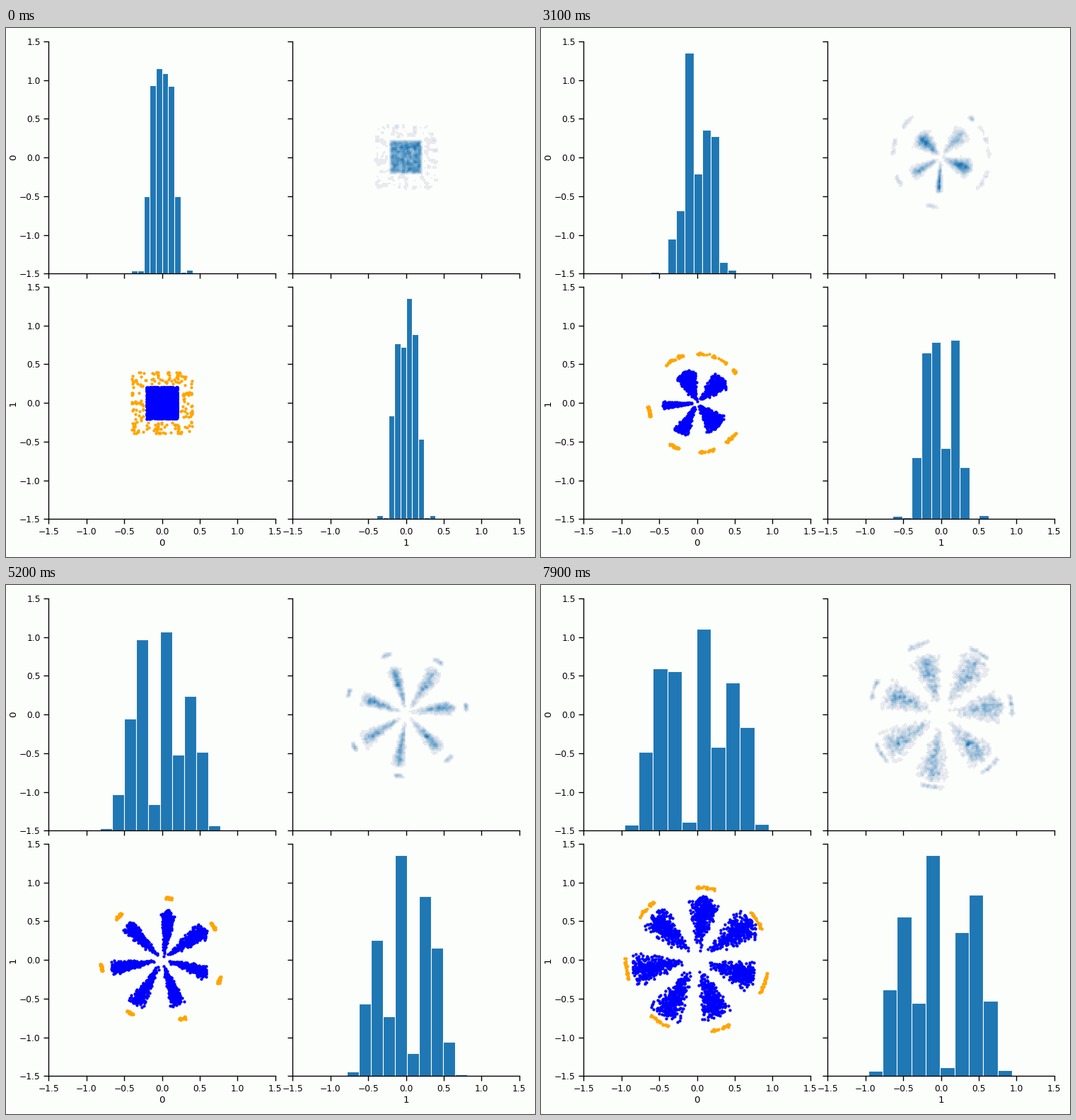
A matplotlib script that plays this animation: 748 by 748 pixels, repeating every 8000 ms.

```python
import numpy as np
import matplotlib.pyplot as plt
from matplotlib.animation import FuncAnimation
from matplotlib.colors import LinearSegmentedColormap

SIZE, DPI = 748, 100
FRAMES, INTERVAL = 80, 100
BG, BAR = "#fcfefc", "#1f77b4"
LIM = 1.5
N_BLUE, N_RING = 2500, 210

plt.rcParams.update({
    "font.family": "DejaVu Sans", "font.size": 8.8,
    "axes.linewidth": 1.0, "axes.facecolor": BG, "figure.facecolor": BG,
    "savefig.facecolor": BG,
})

# Key poses: times in seconds, histogram ranges and bar heights
TIMES = np.array([0, 1.3, 3.1, 4.4, 5.9, 6.8, 7.9])

RANGE_0 = np.array([(-.403, .407), (-.538, .538), (-.613, .52), (-.763, .716),
                    (-.875, .828), (-.931, .89), (-.964, .95)])
RANGE_1 = np.array([(-.385, .392), (-.538, .53), (-.64, .632), (-.707, .745),
                    (-.843, .857), (-.885, .9), (-.964, .941)])
HIST_0 = np.array([
    (.035, .035, 1.0, 2.43, 2.645, 2.585, 2.415, 1.0, .02, .05),
    (.01, .02, 0, .025, 2.605, 2.852, 0, 0, .01, .01),
    (.02, 0, .45, .815, 2.852, 1.29, 1.852, 1.77, .15, .05),
    (.02, .285, 1.19, 2.53, .51, 2.605, .95, 1.795, .72, .05),
    (.035, .635, 1.67, 2.404, .195, 2.53, 1.0, 1.685, 1.27, .08),
    (.045, .855, 1.95, 2.404, .155, 2.615, 1.155, 1.857, 1.43, .095),
    (.08, 1.015, 2.093, 2.057, .11, 2.596, 1.08, 1.906, 1.335, .085),
])
HIST_1 = np.array([
    (.05, .02, 1.335, 2.267, 2.22, 2.85, 2.377, 1.03, .02, .045),
    (.008, .01, 0, .07, 2.64, 2.74, .025, 0, .01, .003),
    (.035, .025, .8, 2.148, 2.285, .914, 2.31, .667, .01, .045),
    (.05, .8, 1.675, .75, 2.85, .457, 2.36, 1.43, .256, .018),
    (.06, 1.05, 1.82, .777, 2.85, .146, 2.276, 1.846, .604, .027),
    (.075, 1.3, 1.915, 1.02, 2.85, .12, 2.25, 2.13, .832, .05),
    (.07, 1.11, 2.05, .94, 2.85, .11, 1.856, 2.335, .97, .078),
])
BAR_TOP = 2 * LIM / 1.05

rng = np.random.default_rng(7)


def polar(r, deg):
    a = np.radians(deg)
    return np.column_stack([r * np.cos(a), r * np.sin(a)])


def blue_poses():
    """Square, collapsed blob, then seven petals that lengthen and widen."""
    petal = np.arange(N_BLUE) % 7
    s = rng.beta(3.5, 1.8, N_BLUE)
    z = np.clip(rng.normal(size=N_BLUE), -2.3, 2.3)
    jitter = rng.normal(0, .006, (N_BLUE, 2))
    reach = np.array([.83, .9, .8, .8, .87, .88, .83])
    angle = np.array([83, 35, -17, -70, -122, -171, 136])
    early = np.array([112, 43, -46, -50, -120, -176, 113])
    early_width = np.array([8, 7.5, 9, 9, 5, 2.2, 8])
    thin_width = np.array([1.8, 3.6, 2, 2.6, 2.8, 1.3, 2.8])
    bend = np.array([-14, 4, 16, -4, 2, 2, -2])

    def petals(scale, inner, deg, width, curve=0 * bend):
        r = reach[petal] * scale * (inner + (1 - inner) * s)
        spread = np.broadcast_to(width, 7)[petal] * z
        return polar(r, deg[petal] + curve[petal] * (1 - s) + spread) + jitter

    square = rng.uniform(-.205, .205, (N_BLUE, 2))
    sigma = np.where(rng.random(N_BLUE) < .6, .022, .05)
    blob = np.clip(rng.normal(size=(N_BLUE, 2)), -2.6, 2.6) * sigma[:, None]
    return np.array([
        square, blob,
        petals(.52, 0, early, early_width),
        petals(.7, 0, angle, thin_width, bend),
        petals(.86, .03, angle, 4.8),
        petals(.94, .07, angle, 6),
        petals(1, .1, angle, 6.5),
    ])


def ring_poses():
    """Radius and angle of the outer points: square, circle, then seven arcs."""
    arc = np.arange(N_RING) % 7
    u = rng.uniform(-1, 1, N_RING)
    centre = 84 - 360 / 7 * arc
    free = centre + 180 / 7 * u
    free += 5 * np.sin(np.radians(9 * free))
    a = np.radians(free)
    inward = 1 - .38 * rng.random(N_RING) ** 2
    square = .395 * inward / np.maximum(abs(np.cos(a)), abs(np.sin(a)))
    mid = np.array([74, 39.5, -45, -78, -118, -170, 118])
    mid_width = np.array([22, 2.5, 8, 10, 6, 6, 12])
    small = np.array([1, 3, 1.2, 1, 1, .8, 1.8])
    wobble = rng.normal(0, .007, N_RING)
    radius = [square] + [r + wobble for r in (.535, .64, .745, .855, .9, .94)]
    angle = [free, free, mid[arc] + mid_width[arc] * u, centre + small[arc] * u,
             centre + 5.5 * u, centre + 7.2 * u, centre + 8.6 * u]
    return np.array(radius), np.array(angle)


BLUE = blue_poses()
RING_R, RING_A = ring_poses()


def phase(t):
    """Index of the current key pose and eased progress to the next."""
    k = min(np.searchsorted(TIMES, t, side="right") - 1, len(TIMES) - 2)
    p = (t - TIMES[k]) / (TIMES[k + 1] - TIMES[k])
    if k == 0:
        p = 1 - (1 - p) ** 3
    elif k == 1:
        p = p ** 2
    return k, p


def blend(keys, k, p):
    return keys[k] * (1 - p) + keys[k + 1] * p


# Density map
CELLS = 116
EXTENT = 1.08
EDGES = np.linspace(-EXTENT, EXTENT, CELLS + 1)
KERNEL = np.array([.25, .5, .25])


def density(points):
    h = np.histogram2d(points[:, 0], points[:, 1], bins=(EDGES, EDGES))[0]
    for axis in (0, 1):
        h = sum(w * np.roll(h, d, axis) for w, d in zip(KERNEL, (-1, 0, 1)))
    h /= h.max()
    return np.ma.masked_where(h < .02, np.minimum(np.floor(h * 10), 9) / 9)


# Layout
fig = plt.figure(figsize=(SIZE / DPI, SIZE / DPI), dpi=DPI)


def panel(left, top, xlabels, ylabels):
    w, h = 320.5, 328.4
    ax = fig.add_axes([left / SIZE, 1 - (top + h) / SIZE, w / SIZE, h / SIZE])
    ax.set(xlim=(-LIM, LIM), ylim=(-LIM, LIM),
           xticks=np.arange(-1.5, 1.6, .5), yticks=np.arange(-1.5, 1.6, .5))
    ax.xaxis.set_major_formatter("{x:.1f}")
    ax.yaxis.set_major_formatter("{x:.1f}")
    ax.tick_params(length=4.8, width=1, pad=3.5, labelbottom=xlabels,
                   labelleft=ylabels)
    ax.spines[["top", "right"]].set_visible(False)
    return ax


X0, X1, Y0, Y1 = 60.3, 405.3, 18.9, 365.9
ax_h0 = panel(X0, Y0, False, True)
ax_map = panel(X1, Y0, False, False)
ax_dots = panel(X0, Y1, True, True)
ax_h1 = panel(X1, Y1, True, False)


def label(x, y, text, rotation=0):
    fig.text(x / SIZE, 1 - y / SIZE, text, size=9.6, rotation=rotation,
             rotation_mode="anchor", ha="center", va="baseline")


label(220.5, 732, "0")
label(565.5, 732, "1")
label(14, 183, "0", 90)
label(14, 531, "1", 90)


def make_bars(ax):
    return ax.bar(np.zeros(10), np.zeros(10), bottom=-LIM, align="edge",
                  color=BAR, edgecolor=BG, linewidth=.8)


bars_0, bars_1 = make_bars(ax_h0), make_bars(ax_h1)
for axis in (ax_h0, ax_h1):
    axis.set(xlim=(-LIM, LIM), ylim=(-LIM, LIM))

cmap = LinearSegmentedColormap.from_list("light", ["#e8eaef", BAR])
image = ax_map.imshow(np.zeros((CELLS, CELLS)), cmap=cmap, vmin=0, vmax=1,
                      origin="lower", interpolation="nearest", aspect="auto",
                      extent=(-EXTENT, EXTENT, -EXTENT, EXTENT))
ax_map.set(xlim=(-LIM, LIM), ylim=(-LIM, LIM))

blue_dots, = ax_dots.plot([], [], "o", ms=3.1, mew=0, color="blue")
ring_dots, = ax_dots.plot([], [], "o", ms=3.1, mew=0, color="orange")


def set_bars(bars, limits, heights):
    step = (limits[1] - limits[0]) / 10
    for i, (bar, h) in enumerate(zip(bars, heights)):
        bar.set(x=limits[0] + i * step, width=step, height=h)
        bar.set_visible(h > .002)


def update(frame):
    k, p = phase(frame * INTERVAL / 1000)
    blue = blend(BLUE, k, p)
    ring = polar(blend(RING_R, k, p), blend(RING_A, k, p))
    blue_dots.set_data(*blue.T)
    ring_dots.set_data(*ring.T)
    image.set_data(density(np.vstack([blue, ring])))

    h0, h1 = blend(HIST_0, k, p), blend(HIST_1, k, p)
    scale = BAR_TOP / max(h0.max(), h1.max())
    set_bars(bars_0, blend(RANGE_0, k, p), h0 * scale)
    set_bars(bars_1, blend(RANGE_1, k, p), h1 * scale)
    return [blue_dots, ring_dots, image, *bars_0, *bars_1]


anim = FuncAnimation(fig, update, frames=FRAMES, interval=INTERVAL,
                     repeat=True, repeat_delay=0, blit=False)
plt.show()
```
